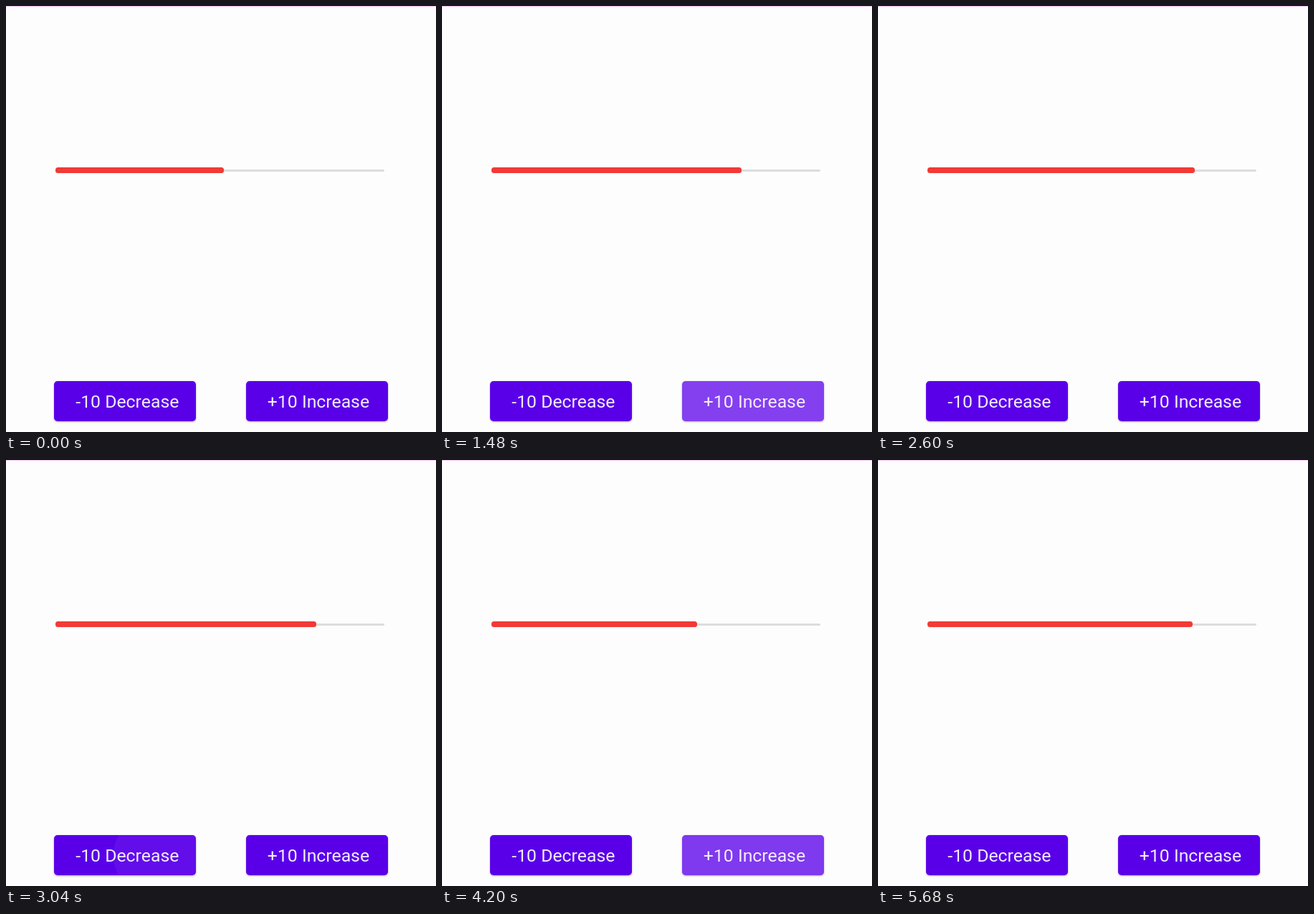
An HTML page that plays this animation: 600x594 px, repeating every 5720 ms.

```html
<!DOCTYPE html>
<html lang="en">
<head>
<meta charset="utf-8">
<title>Progress buttons</title>
<style>
  html, body { margin: 0; width: 100%; height: 100%; overflow: hidden; background: #fefdfe; }
  #stage { position: absolute; left: 0; top: 0; width: 600px; height: 594px; overflow: hidden; background: #fefdfe; }
  #stage div { position: absolute; }
  #edge { left: 0; top: 0; width: 600px; height: 1px; background: #f6c4f6; }
  #track { left: 70px; top: 227.5px; width: 458px; height: 3.5px; border-radius: 2px; background: #dcdcde; }
  #bar { left: 69px; top: 225.3px; height: 8.2px; border-radius: 3.5px; background: #f23a36; }
  .button { top: 523px; width: 198px; height: 56px; border-radius: 5px; background: #5a00e9; }
  #down { left: 67px; }
  #up { left: 334.5px; }
  .clip { inset: 0; overflow: hidden; border-radius: 5px; }
  .ripple { border-radius: 50%; background: #fff; }
  .label { left: 30.3px; top: 0; line-height: 57.5px; font: 400 24.8px/57.5px Roboto, sans-serif; color: #f4ecfd; white-space: pre; }
</style>
</head>
<body>
<div id="stage">
  <div id="edge"></div>
  <div id="track"></div>
  <div id="bar"></div>
  <div id="down" class="button"><div class="clip"><div class="ripple"></div></div><div class="label">-10 Decrease</div></div>
  <div id="up" class="button"><div class="clip"><div class="ripple"></div></div><div class="label">+10 Increase</div></div>
</div>
<script>
const LOOP = 5720, STEP = 40, TWEEN = 800, LAG = 30;
const GROW = 225, FADE_IN = 75, FADE_OUT = 150, LIFT = 120;

// Press time, release time, change in percent
const taps = [
  [320, 370, 10], [660, 735, 10], [930, 990, 10], [1290, 1345, 10],
  [1810, 2035, -10], [2720, 2850, -10], [3025, 3200, -10],
  [3960, 4000, 10], [4720, 4775, 10]
].map(([press, release, delta]) => ({ press, release, delta }));

const clamp = v => Math.max(0, Math.min(1, v));
const mix = (a, b, k) => a + (b - a) * k;

// cubic-bezier(.4, 0, .2, 1)
function ease(x) {
  x = clamp(x);
  let lo = 0, hi = 1;
  for (let i = 0; i < 24; i++) {
    const s = (lo + hi) / 2, r = 1 - s;
    if (1.2 * r * r * s + 0.6 * r * s * s + s * s * s < x) lo = s; else hi = s;
  }
  return 3 * (1 - lo) * lo * lo + lo * lo * lo;
}

// Each tap retargets the running tween from its current value
function progress(t) {
  let from = 50, target = 50, start = 0;
  const at = time => mix(from, target, ease((time - start) / TWEEN));
  for (const tap of taps) {
    const click = tap.release + LAG;
    if (click > t) break;
    from = at(click);
    target += tap.delta;
    start = click;
  }
  return at(t);
}

function makeButton(id, sign, touchX) {
  const node = document.getElementById(id);
  const ripple = node.querySelector(".ripple");
  const mine = taps.filter(tap => tap.delta * sign > 0);
  return t => {
    const tap = mine.filter(p => p.press <= t).pop();
    let alpha = 0, lift = 0;
    if (tap) {
      const age = t - tap.press;
      const fadeAt = Math.max(tap.release, tap.press + GROW);
      const k = ease(age / GROW);
      const r = mix(59.4, 118.5, k), x = mix(touchX, 99, k);
      alpha = 0.25 * clamp(age / FADE_IN) * (1 - clamp((t - fadeAt) / FADE_OUT));
      const peak = ease(Math.min(age, tap.release - tap.press) / LIFT);
      lift = peak * (1 - ease((t - tap.release) / LIFT));
      Object.assign(ripple.style, {
        left: x - r + "px", top: 28 - r + "px", width: 2 * r + "px", height: 2 * r + "px"
      });
    }
    ripple.style.opacity = alpha;
    node.style.boxShadow =
      `0 ${mix(1, 4, lift)}px ${mix(2.5, 8, lift)}px rgba(30,10,60,${mix(0.32, 0.27, lift)})`;
  };
}

const bar = document.getElementById("bar");
const buttons = [makeButton("down", -1, 143), makeButton("up", 1, 101)];

function draw(now) {
  const t = Math.floor((now % LOOP) / STEP) * STEP;
  bar.style.width = 9 + 4.51 * progress(t) + "px";
  buttons.forEach(update => update(t));
}

const began = performance.now();
function tick() {
  draw(performance.now() - began);
  requestAnimationFrame(tick);
}
tick();
</script>
</body>
</html>
```
